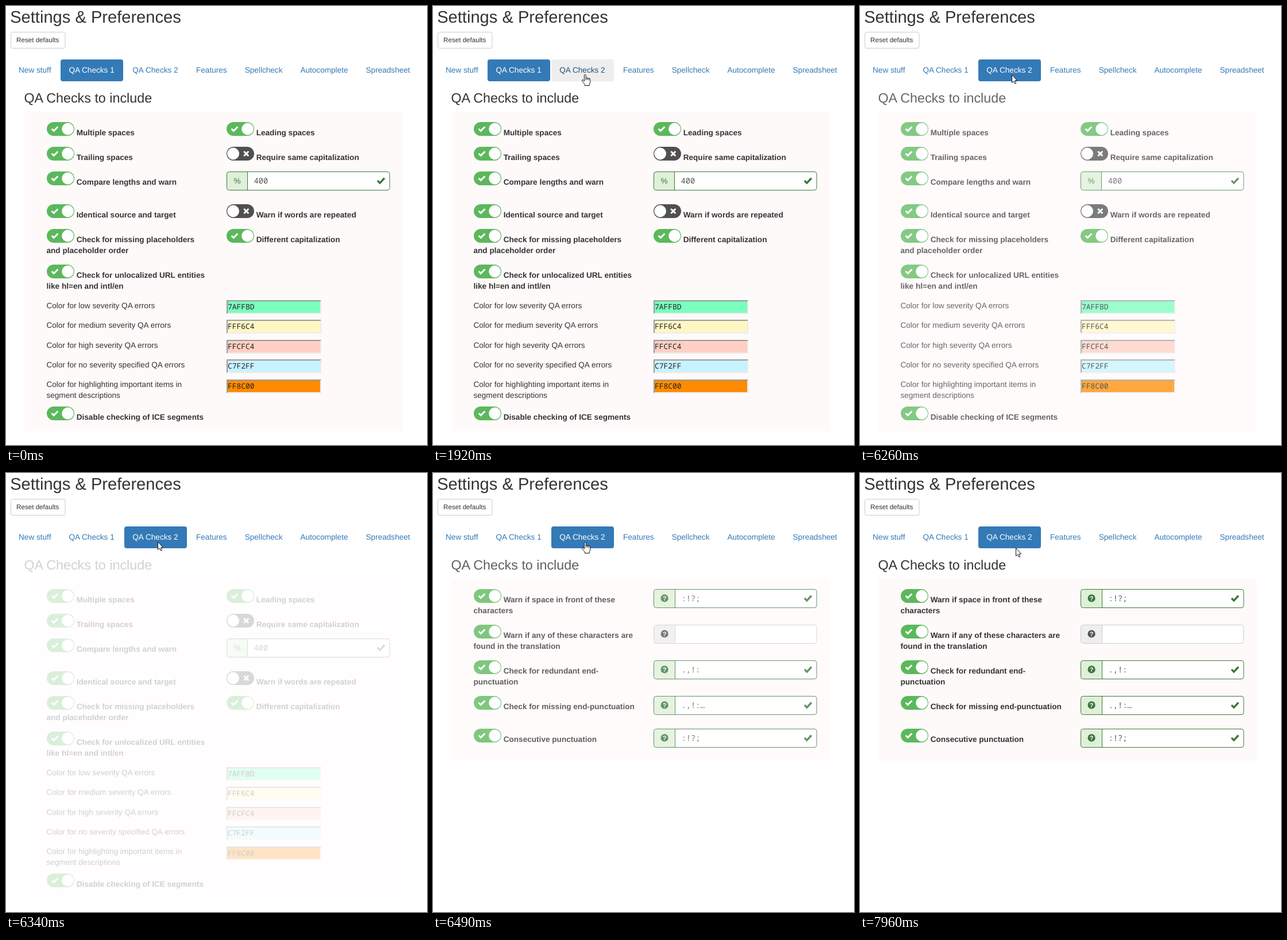
Recreate the animation shown at these times as an HTML page. Size 733 by 764 pixels, loop 8 s.

```html
<!DOCTYPE html>
<html lang="en">
<head>
<meta charset="utf-8">
<title>Settings</title>
<style>
html, body { margin: 0; width: 100%; height: 100%; overflow: hidden; background: #fff; }
svg { display: block; width: 733px; height: 764px; }
text { font: 13.6px "Liberation Sans", Arial, sans-serif; fill: #333; text-rendering: geometricPrecision; white-space: pre; }
.bold { font-weight: bold; }
.mono { font-family: "Noto Sans Mono", monospace; }
</style>
</head>
<body>
<svg id="stage" viewBox="0 0 733 764"></svg>
<script>
const LOOP = 8000;
const GREEN = '#3c763d', LINK = '#337ab7';
const stage = document.getElementById('stage');

function add(parent, tag, attrs, content) {
  const el = document.createElementNS('http://www.w3.org/2000/svg', tag);
  for (const key in attrs) el.setAttribute(key, attrs[key]);
  if (content) el.textContent = content;
  parent.appendChild(el);
  return el;
}
const group = (parent, x = 0, y = 0) => add(parent, 'g', { transform: `translate(${x} ${y})` });
const rect = (parent, x, y, width, height, fill, more) =>
  add(parent, 'rect', { x, y, width, height, fill, ...more });
const text = (parent, x, y, content, size, cls = '', fill = '#333') =>
  add(parent, 'text', { x, y, class: cls, style: `font-size:${size || 13.6}px;fill:${fill}` }, content);
const line = (parent, d, stroke, width) =>
  add(parent, 'path', { d, stroke, 'stroke-width': width, fill: 'none' });

// Switch with its bold label; y is the middle of the switch
function toggle(parent, x, y, on, label, second) {
  const g = group(parent, x, y);
  rect(g, 0, -12, 48, 24, on ? '#5cb85c' : '#505050', { rx: 12 });
  add(g, 'circle', { cx: on ? 36.6 : 11.6, cy: 0, r: 10.4, fill: '#fff' });
  line(g, on ? 'M8.6 -0.2l3.6 3.6l7.2 -7.2' : 'M30.3 -4l8 8m0 -8l-8 8', '#fff', 2.9);
  text(g, 51.7, 11, label, 0, 'bold');
  if (second) text(g, -0.5, 30, second, 0, 'bold');
}

// Text field with an addon on its left; y is the top edge
function field(parent, y, value, icon, addon = 37, valid = true) {
  const g = group(parent, 384.5, y);
  const ink = valid ? GREEN : '#555';
  const edge = valid ? GREEN : '#ccc';
  rect(g, 0, 0, 283.5, 32, '#fff', { rx: 4 });
  add(g, 'path', { d: `M${addon} 0H4a4 4 0 0 0 -4 4V28a4 4 0 0 0 4 4H${addon}Z`, fill: valid ? '#dff0d8' : '#eee' });
  rect(g, 0, 0, 283.5, 32, 'none', { rx: 4, stroke: edge });
  line(g, `M${addon} 0V32`, edge, 1);
  if (icon === '?') {
    add(g, 'circle', { cx: 18.6, cy: 15.4, r: 6.6, fill: ink });
    add(g, 'text', { x: 18.6, y: 19.4, 'text-anchor': 'middle', class: 'bold', style: 'font-size:11px;fill:#fff' }, icon);
  } else {
    text(g, 12, 20.5, icon, 0, '', GREEN);
  }
  text(g, addon + 11.2, 20.6, value, 0, 'mono', '#555');
  if (valid) line(g, 'M262.4 15.4l4 4.2l8 -8.6', GREEN, 3.4);
}

function swatch(parent, y, color) {
  const g = group(parent, 384, y);
  rect(g, 0, 0, 165, 24, '#eeebeb');
  add(g, 'path', { d: 'M0 24V0H165L163 2H2V22Z', fill: '#9a9a9a' });
  rect(g, 2, 2, 161, 20, '#' + color);
  text(g, 2, 16.4, color, 12.93, 'mono', '#222');
}

function pane(height) {
  const g = group(stage);
  text(g, 31.4, 167.6, 'QA Checks to include', 23.3);
  rect(g, 32, 184, 659, height, '#fffafa');
  return g;
}

text(stage, 7.2, 29, 'Settings & Preferences', 29.1);
rect(stage, 8.5, 45.5, 94.5, 28, '#fff', { rx: 3, stroke: '#ccc' });
text(stage, 18, 63, 'Reset defaults', 11.65);

const tabBox = rect(stage, 95, 93, 109, 38, LINK, { rx: 4 });
const hoverBox = rect(stage, 206, 93, 109, 38, '#eee', { rx: 4 });
const tabs = [
  ['New stuff', 22], ['QA Checks 1', 109.4], ['QA Checks 2', 220.3], ['Features', 331],
  ['Spellcheck', 415.7], ['Autocomplete', 512.4], ['Spreadsheet', 626.5]
].map(([name, x]) => text(stage, x, 116, name, 0, '', LINK));

const first = pane(556);
toggle(first, 71, 214, true, 'Multiple spaces');
toggle(first, 71, 257, true, 'Trailing spaces');
toggle(first, 71, 300, true, 'Compare lengths and warn');
toggle(first, 71, 357, true, 'Identical source and target');
toggle(first, 71, 400, true, 'Check for missing placeholders', 'and placeholder order');
toggle(first, 71, 462, true, 'Check for unlocalized URL entities', 'like hl=en and intl/en');
toggle(first, 71, 709, true, 'Disable checking of ICE segments');
toggle(first, 384, 214, true, 'Leading spaces');
toggle(first, 384, 257, false, 'Require same capitalization');
toggle(first, 384, 357, false, 'Warn if words are repeated');
toggle(first, 384, 400, true, 'Different capitalization');
field(first, 288.5, '400', '%', 36);
[
  ['low severity QA errors', '7AFFBD'], ['medium severity QA errors', 'FFF6C4'],
  ['high severity QA errors', 'FFCFC4'], ['no severity specified QA errors', 'C7F2FF'],
  ['highlighting important items in', 'FF8C00']
].forEach(([label, color], i) => {
  text(first, 70.4, 525.6 + 34.45 * i, 'Color for ' + label);
  swatch(first, Math.round(512 + 34.4 * i), color);
});
text(first, 70.4, 682.4, 'segment descriptions');

const second = pane(317);
[
  [214, 'Warn if space in front of these', 'characters', ':!?;'],
  [276, 'Warn if any of these characters are', 'found in the translation', ''],
  [338, 'Check for redundant end-', 'punctuation', '.,!:'],
  [400, 'Check for missing end-punctuation', '', '.,!:…'],
  [457, 'Consecutive punctuation', '', ':!?;']
].forEach(([y, label, more, value]) => {
  toggle(second, 71, y, true, label, more);
  field(second, y - 11.5, value, '?', 37, value !== '');
});

// Both pointers have their hot spot at 0,0
const outline = { fill: '#fff', stroke: '#111', 'stroke-width': 1, 'stroke-linejoin': 'round' };
const arrow = add(stage, 'path', {
  ...outline, d: 'M0.5 0.8V14.6L3.6 11.7L5.6 16.3L7.7 15.4L5.7 10.8H9.7Z'
});
const hand = group(stage);
add(hand, 'path', {
  ...outline,
  d: 'M-1.6 12V1.9a1.4 1.4 0 0 1 2.8 0V7q0 -1.3 1.3 -1.2t1.4 1.5q0 -1.2 1.2 -1.1t1.3 1.6' +
     'q0 -1 1.1 -0.9t1.2 1.5V13.2q0 2 -1.4 3.7V19.5H-0.7V17.4Q-3.4 14.6 -5.4 11.2' +
     'q-0.5 -1.3 0.5 -1.7q1 -0.3 1.9 0.9Z'
});
line(hand, 'M1.2 6.5V10M3.9 7V10M6.4 7.6V10', '#111', 1);

// Pointer stops: [time, x, y, is hand]
const stops = [];
function glide(from, to, count, place) {
  for (let i = 0; i < count; i++)
    stops.push([Math.round((from + (to - from) * i / (count - 1)) / 10) * 10, ...place(i, count)]);
}
const easeOut = (u, power) => 1 - Math.pow(1 - u, power);

glide(460, 1230, 11, i => [618 - 340 * easeOut(i / 10, 2), 748 - 585 * easeOut(i / 10, 1.54), false]);
glide(1300, 1690, 6, i => {
  const u = easeOut((i + 1) / 6, 1.7), y = 163 - 43 * u;
  return [278 - 11 * u, y, y < 131];
});
stops.push([1840, 266, 119, true], [1920, 265, 119, true],
           [6110, 264, 119, false], [6430, 265, 120, true]);
glide(6880, 7110, 4, i => [265 + (i + 1) / 2, 120 + 10 * (i + 1) / 4, i < 2]);
stops.push([7960, 271, 129.5, false]);

// Pane opacities: [time, first, second]
const fades = [
  [0, 1, 0], [6260, 0.75, 0], [6340, 0.22, 0], [6430, 0, 0.25],
  [6490, 0, 0.78], [6570, 0, 0.96], [6650, 0, 1]
];

const current = (list, t) => list.filter(item => item[0] <= t).pop();
const show = (el, on) => el.setAttribute('visibility', on ? 'visible' : 'hidden');

function draw(t) {
  const [, a, b] = current(fades, t);
  first.setAttribute('opacity', a);
  second.setAttribute('opacity', b);

  const stop = current(stops, t);
  show(arrow, stop && !stop[3]);
  show(hand, stop && stop[3]);
  if (stop) {
    const move = `translate(${Math.round(stop[1])} ${Math.round(stop[2])})`;
    arrow.setAttribute('transform', move);
    hand.setAttribute('transform', move);
  }

  const switched = t >= 6260;
  const hovered = !switched && stop && stop[2] < 131;
  tabBox.setAttribute('x', switched ? 206 : 95);
  show(hoverBox, hovered);
  tabs[1].style.fill = switched ? LINK : '#fff';
  tabs[2].style.fill = switched ? '#fff' : hovered ? '#23527c' : LINK;
}

const start = performance.now();
function tick() {
  draw((performance.now() - start) % LOOP);
  requestAnimationFrame(tick);
}
tick();
</script>
</body>
</html>
```
